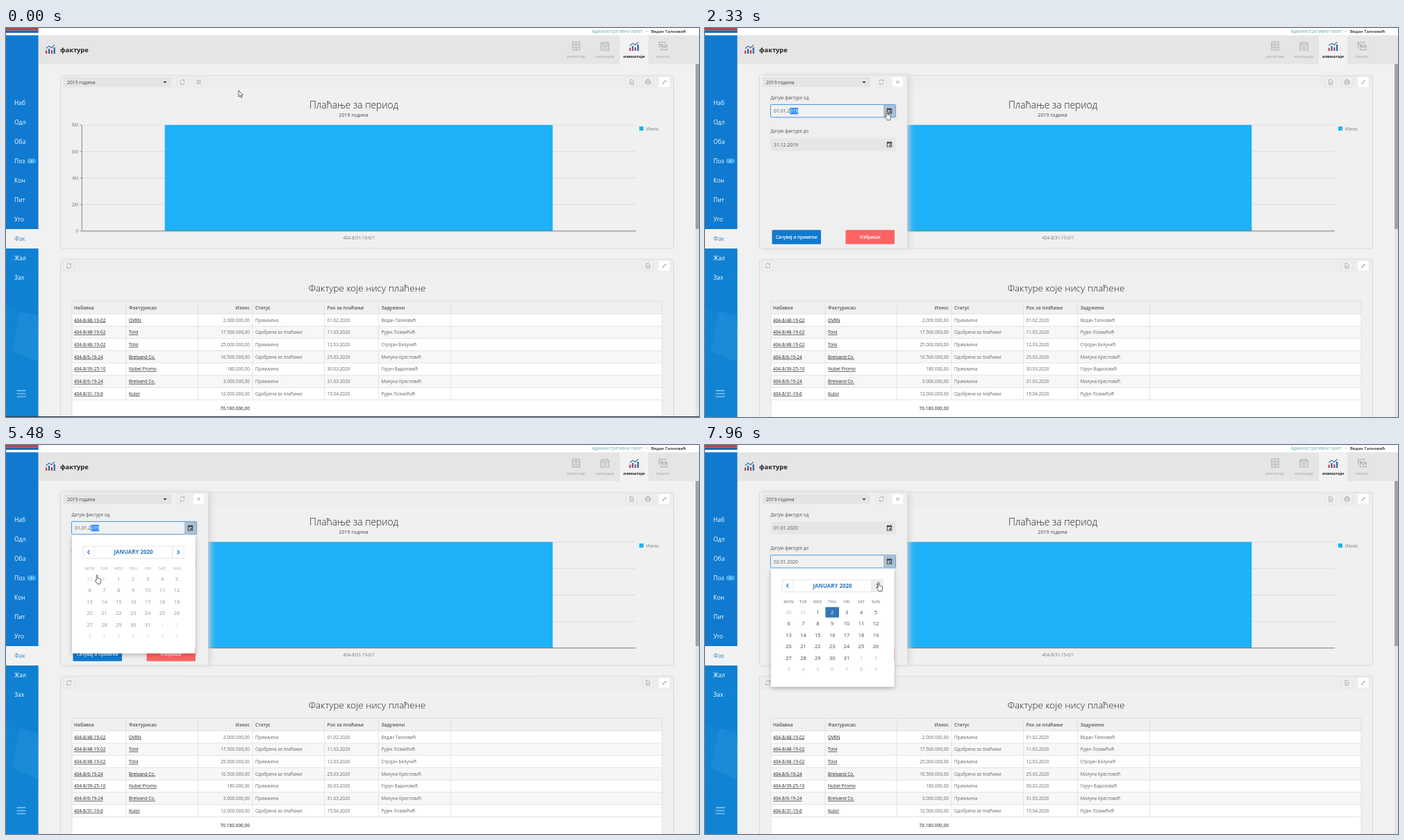
These frames come from a looping animation (998x561 px, 8 s). An HTML page:

```html
<!DOCTYPE html>
<html lang="sr">
<head>
<meta charset="utf-8">
<title>Фактуре</title>
<style>
html, body { margin: 0; width: 100%; height: 100%; overflow: hidden; background: #f0f0f0; }
#stage { display: block; width: 100vw; height: 100vh; font-family: "Open Sans", "Noto Sans", sans-serif; }
text { white-space: pre; }
</style>
</head>
<body>
<svg id="stage" viewBox="0 0 998 561" xmlns="http://www.w3.org/2000/svg">
  <defs>
    <filter id="soft" x="-20%" y="-20%" width="150%" height="150%">
      <feDropShadow dx="3" dy="0" stdDeviation="4" flood-color="#d2d2d2"/>
    </filter>
    <filter id="lift" x="-20%" y="-20%" width="140%" height="140%">
      <feDropShadow dx="0" dy="2" stdDeviation="3" flood-color="#000" flood-opacity=".28"/>
    </filter>
    <linearGradient id="deep" x1="0" y1="0" x2="0" y2="1">
      <stop offset="0" stop-color="#0f7ad0"/>
      <stop offset=".5" stop-color="#0f7ad0"/>
      <stop offset=".62" stop-color="#1186d4"/>
      <stop offset="1" stop-color="#1083d2"/>
    </linearGradient>
  </defs>
  <g id="page"></g>
  <g id="live"></g>
</svg>
<script>
const LOOP = 8000;
const BLUE = '#0f7ad0', LINK = '#2b77bd', BAR = '#1eb1f7';

// Drawing helpers
const rect = (x, y, w, h, fill, more = '') =>
  `<rect x="${x}" y="${y}" width="${w}" height="${h}" fill="${fill}" ${more}/>`;
const text = (x, y, size, fill, str, more = '') =>
  `<text x="${x}" y="${y}" font-size="${size}" fill="${fill}" ${more}>${str}</text>`;
const line = (d, stroke, w = 0.8, more = '') =>
  `<path d="${d}" stroke="${stroke}" stroke-width="${w}" fill="none" ${more}/>`;
const at = (x, y, body) => `<g transform="translate(${x} ${y})">${body}</g>`;
const clip = (x, y, w, h, body) =>
  `<svg x="${x}" y="${y}" width="${w}" height="${h}" viewBox="${x} ${y} ${w} ${h}">${body}</svg>`;
const MID = 'text-anchor="middle"', END = 'text-anchor="end"';
const SEMI = 'font-weight="600"', BOLD = 'font-weight="700"';

const icons = {
  refresh: 'M-3.4-.4A3.3 3.3 0 0 1 2.7-1.9M3.4 .4A3.3 3.3 0 0 1-2.7 1.9M3-3.7V-1.7H1M-3 3.7V1.7H-1',
  sliders: 'M-3.6-2.4H3.6M-3.6 0H3.6M-3.6 2.4H3.6M-1.6-3.2V-1.6M1.6-.8V.8M-1 1.6V3.2',
  sheet: 'M-2.6-3.6H1L2.6-2V3.6H-2.6ZM-1.2-.2H1.2M-1.2 1.6H1.2',
  print: 'M-2.2-1.4V-3.6H2.2V-1.4M-2.2 1.8H-3.8V-1.4H3.8V1.8H2.2M-2.2 .4H2.2V3.6H-2.2Z',
  shrink: 'M.6-.6L3.2-3.2M.6-2.5V-.6H2.5M-.6 .6L-3.2 3.2M-.6 2.5V.6H-2.5',
  close: 'M-2.1-2.1L2.1 2.1M2.1-2.1L-2.1 2.1'
};
const button = (x, y, icon, fill = '#f0f0f0', ink = '#b0b0b0') =>
  rect(x - 7.5, y - 7, 15, 14, fill, `rx="1" stroke="${fill === '#fff' ? '#f6f6f6' : '#dedede'}" stroke-width=".7"`) +
  at(x, y, line(icons[icon], ink, 1));

const chartIcon = (x, y) => at(x, y,
  rect(0, 9, 2.2, 4.5, '#c33d45') + rect(3.9, 6.5, 2.2, 7, '#2769a6') +
  rect(7.8, 8.5, 2.2, 5, '#c33d45') + rect(11.6, 4.5, 2.2, 9, '#2769a6') +
  line('M.8 6L5 2.6 8.6 5 13 .8', '#2769a6', 1.1));

const yearPicker = () =>
  rect(83, 71, 155, 14, '#e4e4e4', 'rx="1"') +
  text(88, 81, 6.8, '#444', '2019 година') +
  '<path d="M226.5 77h5l-2.5 2.8z" fill="#333"/>';

function sidebar() {
  const items = ['Наб', 'Одл', 'Оба', 'Поз', 'Кон', 'Пит', 'Уго', 'Фак', 'Жал', 'Зах'];
  let s = rect(0, 0, 46.6, 3.4, '#b1454c') + rect(0, 3.4, 46.6, 3.6, '#1f67a8') +
    rect(0, 10.5, 46.6, 551, 'url(#deep)') +
    '<path d="M0 345L46.6 322V430L0 400Z" fill="#0f7ad0" opacity=".4"/>' +
    '<path d="M20 408L46.6 415V482L9 466Z" fill="#2c95e2" opacity=".4"/>' +
    rect(0, 290, 47, 28, '#f2f2f2');
  items.forEach((name, i) => {
    s += text(12, 110.5 + i * 28.05, 8.5, i === 7 ? '#3d8cc9' : '#fff', name);
  });
  return s + rect(30.5, 188.3, 12.5, 7, '#43aaf0', 'rx="3.5"') + text(36.8, 193.8, 5, '#fff', '6', MID) +
    line('M15.5 523H28.5M15.5 527.3H28.5M15.5 531.6H28.5', '#75b8ea', 1.8);
}

function header() {
  const grey = '#b0b0b0';
  const tab = (x, name, d) => line(d, grey, 1.1, `transform="translate(${x} 26)"`) +
    text(x, 42.6, 5.7, grey, name, MID + ' ' + SEMI);
  return rect(47, 0, 951, 10.5, '#fff') +
    text(917, 7.3, 6.2, '#6eaab0', 'Административни пакет', END) +
    text(923, 7.3, 6, '#5a9aa5', '•', MID) +
    text(929, 7.3, 6.1, '#222', 'Ведан Талновић', SEMI) +
    rect(47, 10.5, 951, 41.5, '#e5e5e5') + rect(884, 10.5, 41, 41.5, '#f2f2f2') +
    chartIcon(57, 23.5) + text(78, 34.8, 9.3, '#222', 'фактуре', BOLD) +
    tab(821, 'регистар', 'M-5-6H5V6H-5ZM-5-2H5M-5 2H5M-1.5-4H1.5M-1.5 0H1.5M-1.5 4H1.5') +
    tab(862.5, 'календар', 'M-5.5-4.5H5.5V6H-5.5ZM-5.5-1.8H5.5M-2.8-6.5V-3.5M2.8-6.5V-3.5M-3 .7H3M-3 3.3H3') +
    chartIcon(897.5, 19.5) + text(904.5, 42.6, 5.5, '#222', 'извештаји', MID + ' ' + BOLD) +
    tab(946, 'пошта', 'M-2.5-1H6V5.5H-2.5ZM-2.5-1L1.7 2.5 6-1M-5.5 2.5V-5.5H3.5V-3M-5.5-2.5H0') +
    rect(993, 52, 5, 509, '#e4e4e4') + rect(993, 52, 5, 238, '#a3a3a3');
}

const panel = (y, h) => rect(78.5, y, 883, h, '#f0f0f0', 'rx="2" stroke="#d6d6d6" stroke-width=".9"') +
  rect(79, y + 0.5, 882, 19.5, '#ededed');

function chart() {
  let s = panel(68.3, 249.5) + yearPicker() + button(254, 78, 'refresh') + button(277.5, 78, 'sliders') +
    button(901, 78, 'sheet') + button(924.5, 78, 'print') + button(948, 78, 'shrink', '#fff') +
    text(501, 116, 13.8, '#222', 'Плаћање за период', MID + ' font-weight="300"') +
    text(500.5, 128.3, 7.1, '#444', '2019 година', MID);
  ['8M', '6M', '4M', '2M', '0'].forEach((name, i) => {
    const y = 140 + i * 38.2;
    s += line(`M109 ${y}H907`, '#d8d8d8', 0.8) + line(`M106 ${y}H109`, '#888', 0.8) +
      text(104, y + 2.4, 6.3, '#777', name, END);
  });
  return s + rect(228.7, 139.8, 558.6, 153.2, BAR) + line('M109.3 140V292.8H907', '#777', 0.9) +
    text(508.5, 304.8, 6.2, '#777', '404-8/31-19-6/1', MID) +
    rect(912, 142, 6, 6, BAR) + text(922, 147.6, 6.2, '#777', 'Износ');
}

function table() {
  const taken = 'Примљена', passed = 'Одобрена за плаћање';
  const rows = [
    ['404-8/48-19-02', 'OVRN', '2.000.000,00', taken, '01.02.2020', 'Ведан Талновић'],
    ['404-8/48-19-02', 'Tolvi', '17.500.000,00', passed, '11.03.2020', 'Рујан Лозмићић'],
    ['404-8/48-19-02', 'Tolvi', '25.000.000,00', taken, '12.03.2020', 'Стројан Белунић'],
    ['404-8/6-19-24', 'Brelvand Co.', '10.500.000,00', passed, '25.03.2020', 'Милуна Крестовић'],
    ['404-8/39-25-10', 'Nubel Promo', '180.000,00', taken, '30.03.2020', 'Горун Вадиловић'],
    ['404-8/6-19-24', 'Brelvand Co.', '3.000.000,00', taken, '31.03.2020', 'Милуна Крестовић'],
    ['404-8/31-19-6', 'Kulor', '12.000.000,00', passed, '15.04.2020', 'Рујан Лозмићић']
  ];
  const heads = ['Набавка', 'Фактурисао', 'Износ', 'Статус', 'Рок за плаћање', 'Задужени'];
  const left = [98, 177, 351, 359, 462.5, 540.5];
  const side = i => i === 2 ? END : '';
  const rule = '#dadada', pitch = 17.7, top = 412.3;
  let s = panel(333.3, 240) + button(90.5, 343, 'refresh') + button(924.5, 343, 'sheet') +
    button(948, 343, 'shrink', '#fff') +
    text(520, 379.8, 13.5, '#222', 'Фактуре које нису плаћене', MID + ' font-weight="300"') +
    rect(95, 394, 850, 170, '#fff') + rect(95, 394, 850, 18.3, '#f0f0f0');
  heads.forEach((h, i) => { s += text(left[i], 405.7, 6.7, '#555', h, side(i) + ' ' + SEMI); });
  rows.forEach((row, r) => {
    const y = top + r * pitch;
    if (r % 2) s += rect(95, y, 850, pitch, '#f7f7f7');
    s += line(`M95 ${y}H945`, rule, 0.7);
    row.forEach((cell, i) => {
      const look = i < 2 ? 'text-decoration="underline"' : side(i);
      s += text(left[i], y + 11.2, i < 3 || i === 4 ? 6.45 : 6.25, i < 2 ? '#222' : '#666', cell, look);
    });
  });
  const foot = top + rows.length * pitch;
  s += line(`M95 ${foot}H945M95 394H945M95 394V561M945 394V561`, rule, 0.8);
  [173, 276.5, 355, 458.5, 536.5, 640.5].forEach(x => { s += line(`M${x} 394V${foot}`, rule, 0.7); });
  return s + text(351, 551.2, 6.5, '#555', '70.180.000,00', END + ' ' + SEMI);
}

// Timing: bursts of change [first, last, steps]
const bursts = [[280, 750, 7], [940, 1720, 11], [1800, 1880, 2], [2090, 2870, 11], [2970, 3110, 3],
  [3280, 3810, 8], [3980, 4760, 11], [4830, 4910, 2], [5060, 5060, 1], [5230, 6010, 11],
  [6070, 6070, 1], [6250, 6860, 9], [7180, 7960, 11]];
function snap(t) {
  let s = 0;
  for (const [a, b, n] of bursts) {
    if (t < a) break;
    const step = (b - a) / (n - 1 || 1);
    s = t >= b ? b : a + Math.floor((t - a) / step + 1e-6) * step;
  }
  return s;
}
const ramp = (t, from, span) => Math.min(1, Math.max(0, (t - from) / span));
const swing = p => 0.5 - Math.cos(Math.PI * p) / 2;

// Pointer stops [time, x, y]
const stops = [[200, 335, 90], [750, 277, 76], [1180, 277, 77], [1330, 259, 83], [1720, 244, 112],
  [1880, 262, 120], [2400, 262, 120], [2870, 207, 156], [3110, 205, 157], [3280, 205, 157],
  [3520, 233, 153], [3810, 248, 153], [4060, 248, 153], [4690, 177, 183], [4760, 163, 187],
  [4910, 127, 187], [5300, 127, 187], [6010, 160, 191], [6070, 162, 192], [6250, 162, 193],
  [6330, 162, 193], [6860, 265, 166], [7400, 265, 166], [7960, 250, 198]];
function pointerAt(t) {
  const i = stops.findIndex(k => k[0] > t);
  if (i === 0) return stops[0].slice(1);
  if (i < 0) return stops[stops.length - 1].slice(1);
  const [a, b] = [stops[i - 1], stops[i]];
  const p = swing((t - a[0]) / (b[0] - a[0]));
  return [a[1] + (b[1] - a[1]) * p, a[2] + (b[2] - a[2]) * p];
}
function pointer(t, [x, y]) {
  const arrow = (t < 940 && x > 285) || (t > 1400 && t < 1800) || (t >= 6250 && t < 6780);
  const d = arrow
    ? 'M0 0V9.3L2.1 7.3 3.5 10.4 4.9 9.8 3.5 6.8H6.2Z'
    : 'M-.9 7.8V.9a.9.9 0 0 1 1.8 0V4.7l3.7.8q1.2.3 1.1 1.6L5.2 10.2 4.6 12.8H.4L-2.7 8.4Q-3 7.2-2 7Z';
  return `<path d="${d}" transform="translate(${x} ${y})" fill="#fff" stroke="#222" stroke-width=".7" stroke-linejoin="round"/>`;
}

function field(y, label, value, focus, active, marked) {
  const shown = marked ? `01.01.2<tspan fill="#fff">019</tspan>` : value;
  return text(94.5, y - 7, 6.4, '#555', label) +
    rect(94.4, y + 0.4, 180.2, 18.4, focus ? '#f0f1f2' : '#e6e6e6',
      focus ? 'rx="1" stroke="#4c97d6" stroke-width="1"' : 'rx="1"') +
    (active ? rect(257, y + 1, 17.2, 17.2, '#abc0d2') : '') +
    (marked ? rect(122.2, y + 5, 11.8, 9.4, '#3390ff') : '') +
    text(99, y + 12.1, 6.85, '#555', shown) +
    at(265.5, y + 9.4, '<path d="M-3.7-3.2H3.7V4H-3.7ZM-2.8-1.2V3.1H2.8V-1.2Z" fill="#333" fill-rule="evenodd"/>' +
      rect(0, 0.4, 2, 2, '#333') + line('M-2-4.2V-3M2-4.2V-3', '#333', 1));
}

function settings(t, tip) {
  const h = 249 * swing(ramp(t, 1073, 400));
  if (h <= 0) return '';
  const base = 68.3 + h - 26;
  const act = (x, fill, name) => rect(x, base, 70.5, 20.5, fill, 'rx="1.5"') +
    text(x + 35.2, base + 12.6, 6.2, '#fff', name, MID + ' ' + SEMI);
  const picked = t >= 6250;
  const over = Math.abs(tip[0] - 254) < 7.5 && Math.abs(tip[1] - 78) < 7;
  return rect(79, 68.5, 212, h, '#efefef', 'filter="url(#soft)"') +
    clip(79, 68.5, 212, h,
      field(110, 'Датум фактуре од', picked ? '01.01.2020' : '01.01.2019',
        t >= 2090 && t < 7180, t >= 2090 && !picked, t >= 2090 && !picked) +
      field(158.4, 'Датум фактуре до', t >= 6330 ? '02.01.2020' : '31.12.2019', t >= 7180, t >= 7180) +
      act(96.5, BLUE, 'Сачувај и примени') + act(202.5, '#ff6363', 'Избриши')) +
    yearPicker() + button(254, 78, 'refresh', '#f0f0f0', over ? '#7f93a8' : '#b0b0b0') +
    button(277.5, 78, 'close', '#fff', '#999');
}

const tooltip = t => t < 940 || t > 1420 ? '' :
  rect(284.2, 84.4, 45.4, 12.4, '#fff', 'stroke="#555" stroke-width=".9"') +
  text(307, 93, 6, '#555', 'Подешавања', MID);

// Calendar parts; y = 0 is the top edge of the drop-down
function days(year, chosen, hot) {
  const lead = (new Date(year, 0, 1).getDay() + 6) % 7;
  let s = '';
  ['MON', 'TUE', 'WED', 'THU', 'FRI', 'SAT', 'SUN'].forEach((d, i) => {
    s += text(120.5 + i * 20.9, 50, 5.8, '#888', d, MID + ' ' + SEMI);
  });
  for (let i = 0; i < 42; i++) {
    const date = new Date(year, 0, 1 - lead + i), own = date.getMonth() === 0;
    const x = 120.5 + (i % 7) * 20.9, y = 63.4 + Math.floor(i / 7) * 16.5;
    const on = own && date.getDate() === chosen;
    const over = Math.abs(hot[0] - x) < 10 && Math.abs(hot[1] - y) < 7.8;
    if (on || over) s += rect(x - 9.8, y - 7.5, 19.6, 15, on ? '#3276b8' : '#f0f0f0', 'rx="1"');
    s += text(x, y + 2.7, 7.4, on ? '#fff' : own ? '#444' : '#b8b8b8', date.getDate(), MID);
  }
  return s;
}
function months(year, hot) {
  let s = '';
  'Jan Feb Mar Apr May Jun Jul Aug Sep Oct Nov Dec'.split(' ').forEach((m, i) => {
    const x = 128.8 + (i % 4) * 36.6, y = 61 + Math.floor(i / 4) * 37.4;
    const over = Math.abs(hot[0] - x) < 18 && Math.abs(hot[1] - y) < 18;
    const first = year === 2020 && i === 0;
    if (over || first) {
      s += rect(x - 17.8, y - 18, 35.6, 36, over ? '#f2f2f2' : '#fff',
        first ? 'rx="1" stroke="#b5b5b5" stroke-width=".9"' : 'rx="1"');
    }
    s += text(x, y + 2.7, 7.4, '#333', m, MID + (year === 2020 && i === 5 ? ' ' + BOLD : ''));
  });
  return s;
}
const fade = (body, o) => o > 0 ? `<g opacity="${o}">${body}</g>` : '';

function calendar(t, tip) {
  const second = t >= 7180;
  const top = second ? 177.8 : 129.5;
  const open = second ? swing(ramp(t, 7240, 240)) : swing(ramp(t, 2390, 240)) * (1 - swing(ramp(t, 6320, 200)));
  if (open <= 0) return '';
  const hot = [tip[0], tip[1] - top];
  const up = ramp(t, 3280, 400), next = swing(ramp(t, 4040, 400)), down = ramp(t, 5230, 400);
  let title, body;
  if (t < 3280) {
    title = 'JANUARY 2019';
    body = days(2019, 1, hot);
  } else if (t < 4040) {
    title = '2019';
    body = fade(days(2019, 1, hot), up < 0.5 ? 1 - 2 * up : 0) + fade(months(2019, [0, 0]), Math.min(1, up * 1.4));
  } else if (t < 5230) {
    title = '2020';
    body = next < 1
      ? at(-146 * next, 0, months(2019, [0, 0])) + at(146 * (1 - next), 0, months(2020, [0, 0]))
      : months(2020, hot);
  } else {
    title = 'JANUARY 2020';
    body = fade(months(2020, [0, 0]), down < 0.5 ? 1 - 2 * down : 0) +
      fade(days(2020, second ? 2 : t >= 6250 ? 1 : 0, hot), down);
  }
  const inHead = hot[1] > 16 && hot[1] < 34;
  const zone = (x, w) => inHead && hot[0] > x && hot[0] < x + w ? rect(x, 16.5, w, 17.5, '#efefef') : '';
  const box = rect(95, 0, 177.5, 171, '#fff', 'rx="1" filter="url(#lift)"') +
    zone(111, 16) + zone(127, 113) + zone(240, 16) +
    rect(111, 16.5, 145, 17.5, 'none', 'stroke="#dedede" stroke-width=".8"') +
    line('M127.2 16.5V34M239.8 16.5V34', '#dedede', 0.8) +
    line('M120.4 22L117.6 25 120.4 28M246.8 22L249.6 25 246.8 28', LINK, 1.2) +
    text(183.5, 27.8, 7.9, LINK, title, MID + ' ' + BOLD) +
    clip(110, 40, 148, 126, body);
  return clip(80, top, 210, 185 * open, at(0, top - 171 * (1 - open), box));
}

document.getElementById('page').innerHTML =
  rect(0, 0, 998, 561, '#fff') + rect(46.6, 52, 951.4, 509, '#f1f1f1') + sidebar() + header() + chart() + table();

const live = document.getElementById('live');
let last = -1;
function draw(now) {
  const raw = now % LOOP;
  const t = raw < 70 ? 0 : snap(raw) || 70;
  if (t !== last) {
    last = t;
    const tip = pointerAt(t);
    live.innerHTML = settings(t, tip) + tooltip(t) + calendar(t, tip) + pointer(t, tip) +
      (t < 70 ? rect(0, 560, 998, 1, '#2b3a45') : '');
  }
}
function tick() {
  draw(performance.now());
  requestAnimationFrame(tick);
}
tick();
</script>
</body>
</html>
```
